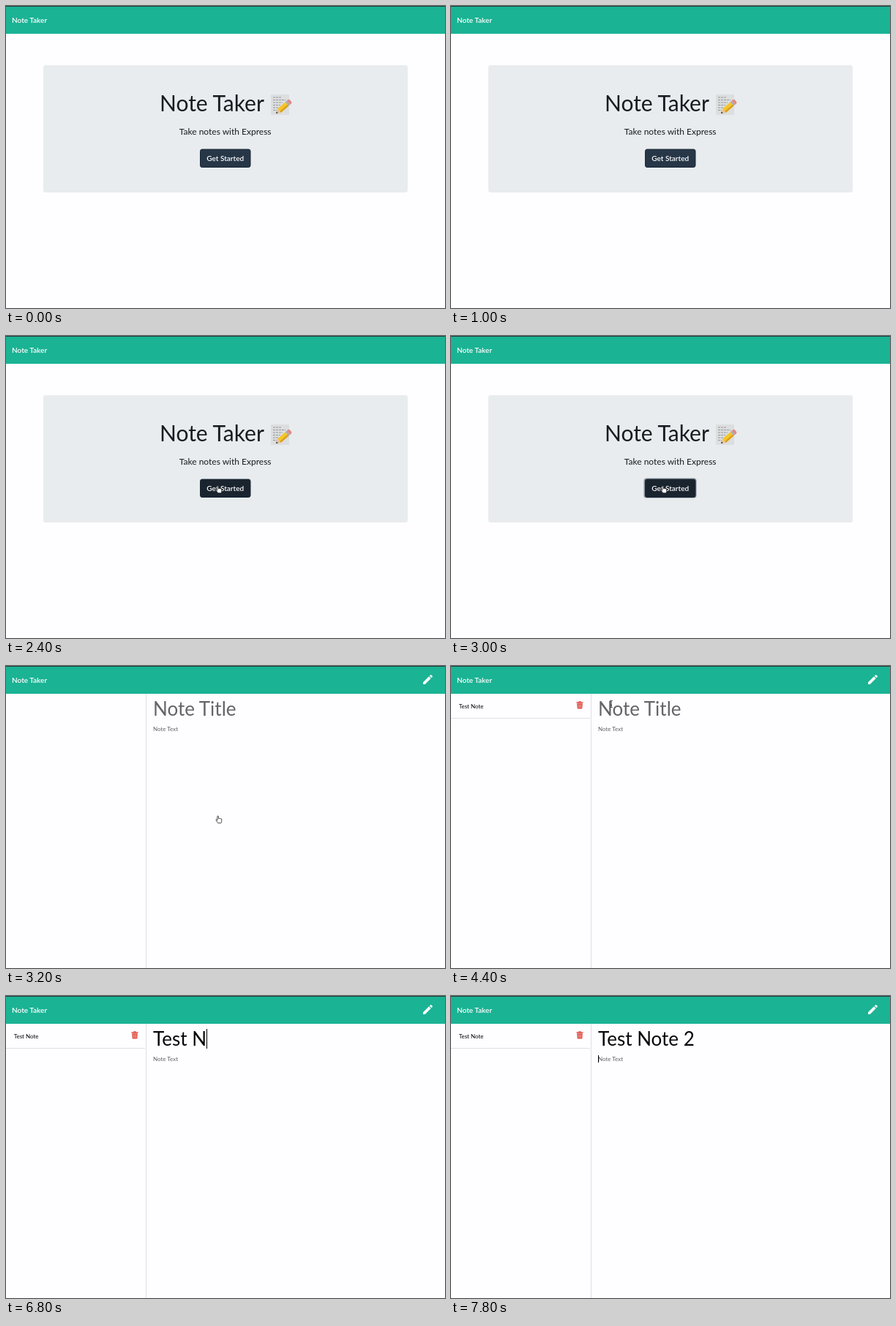
Animation, 600 px wide and 413 px high, one loop 8000 ms. Source, as an HTML page:

```html
<!DOCTYPE html>
<html lang="en">
<head>
<meta charset="utf-8">
<title>Note Taker</title>
<style>
  html, body { margin: 0; width: 100%; height: 100%; overflow: hidden; background: #fefdff; }
  svg { display: block; font-family: Lato, sans-serif; }
  text { white-space: pre; }
  .bold { font-weight: 600; font-size: 10px; fill: #fff; }
  .small { font-size: 8px; }
  #title { font-size: 26px; }
  .middle { text-anchor: middle; fill: #181c20; }
</style>
</head>
<body>
<svg width="600" height="413" viewBox="0 0 600 413">
  <rect width="600" height="413" fill="#fefdff"/>
  <rect width="600" height="38" fill="#1ab394"/>
  <rect width="600" height="1" fill="#20403f"/>
  <text class="bold" x="8" y="23">Note Taker</text>

  <g id="home">
    <rect x="51" y="81" width="498" height="174" rx="3" fill="#e8ecee"/>
    <text x="210" y="144" font-size="30" fill="#181c20">Note Taker</text>
    <g id="memo">
      <rect x="362" y="121" width="25" height="28" rx="1" fill="#dcdedf"/>
      <path d="M365 125h11M365 128.5h17M365 132h13M365 135.5h10M365 139h8M365 142.5h5" stroke="#92979b" stroke-dasharray="3 1"/>
      <g transform="translate(369 147) rotate(-41)">
        <path d="M0 0L6-3.5V3.5Z" fill="#e9c493"/>
        <path d="M0 0L2.4-1.4V1.4Z" fill="#333"/>
        <path d="M6-3.5H20V3.5H6Z" fill="#f5c52c"/>
        <path d="M6 1.2H20V3.5H6Z" fill="#dc9c19"/>
        <path d="M20-3.5h2.5v7H20Z" fill="#a9adb0"/>
        <path d="M22.5-3.5h2q2 0 2 2v3q0 2-2 2h-2Z" fill="#e08a86"/>
      </g>
    </g>
    <text class="middle" x="299.7" y="175.5" font-size="12">Take notes with Express</text>
    <rect id="ring" x="263.5" y="194.5" width="72" height="27" rx="3.5" fill="#8b949b"/>
    <rect id="button" x="265.5" y="196" width="68.5" height="24.5" rx="2.5" stroke="#1b2836"/>
    <text class="bold" x="299.7" y="212" text-anchor="middle">Get Started</text>
  </g>

  <g id="notes">
    <path d="M191.5 38V413" stroke="#dfdfe3"/>
    <path transform="translate(567.9 9.8) scale(.72)" fill="#fff"
      d="M3 17.25V21h3.75L17.81 9.94l-3.75-3.75zM20.71 7.04a1 1 0 0 0 0-1.41l-2.34-2.34a1 1 0 0 0-1.41 0l-1.83 1.83 3.75 3.75z"/>
    <g id="list">
      <path d="M0 71.5H190" stroke="#dfdfe3"/>
      <text class="small" x="10.7" y="58">Test Note</text>
      <g fill="#df4a40">
        <path d="M171.5 49.3h2.6l.7-1.1h2.4l.7 1.1h2.6v1.4h-9z"/>
        <path d="M172.2 51.3h7.6l-.4 6.3q-.1 1-1 1h-4.8q-.9 0-1-1z"/>
        <path d="M174.2 52.5v4.8M176 52.5v4.8M177.8 52.5v4.8" stroke="#fbd9d6" stroke-width=".6"/>
      </g>
    </g>
    <text id="title" x="201" y="68"></text>
    <text class="small" x="201" y="89" fill="#626166">Note Text</text>
    <rect id="caret" width="1"/>
  </g>

  <g id="cursor">
    <path id="arrow" d="M0 0V9.2L2.1 7.3 3.5 10.5 5 9.8 3.7 6.8H6.4Z" fill="#000" stroke="#fff" stroke-width=".6"/>
    <path id="hand" fill="#fff" stroke="#222" stroke-width=".8" stroke-linejoin="round"
      d="M-2.2 1.2V-4q0-.9.8-.9t.8.9V-1.2q.8-.8 1.5 0 .8-.7 1.4.1 1.4-.4 1.4.9V2.2q0 1.2-.8 2.6H-1.2L-3.9 1.2q-.5-1.2.5-1.2z"/>
    <path id="beam" fill="none" stroke="#222" stroke-width=".9" d="M-1.8-4.7Q0-4.7 0-3.8 0-4.7 1.8-4.7M0-3.8V3.8M-1.8 4.7Q0 4.7 0 3.8 0 4.7 1.8 4.7M-1 1.5H1"/>
  </g>
</svg>
<script>
const LOOP = 8000, STEP = 200, NOTE = "Test Note 2";
const OPEN = 3200, LISTED = 3400, FOCUS = 4600, TAB = 7800;

// [time, x, y] along the pointer's way
const route = [
  [1200, 580, 399], [1400, 566, 394], [1800, 399, 337], [2200, 293, 212], [2400, 291, 210],
  [3400, 291, 210], [3800, 289, 254], [4200, 232, 82], [4400, 219, 52]
];
// [time, letters typed]
const typing = [[0, 0], [5600, 1], [5800, 3], [6000, 4], [6400, 5], [6800, 6], [7000, 7], [7200, 9], [7400, 10], [7600, 11]];

const $ = id => document.getElementById(id);
const show = (id, on) => $(id).style.display = on ? "" : "none";
const set = (id, attrs) => Object.entries(attrs).forEach(([k, v]) => $(id).setAttribute(k, v));

function pointerAt(t) {
  const i = route.findIndex(p => p[0] > t);
  if (i < 0) return route.at(-1).slice(1);
  const [t0, x0, y0] = route[Math.max(i - 1, 0)], [t1, x1, y1] = route[i];
  const k = Math.max(0, (t - t0) / (t1 - t0 || 1));
  return [x0 + (x1 - x0) * k, y0 + (y1 - y0) * k];
}

function draw(t) {
  const opened = t >= OPEN;
  show("home", !opened);
  show("notes", opened);
  show("list", t >= LISTED);

  show("ring", t >= 2800);
  set("button", { fill: t >= 2200 ? "#1a242f" : "#273748" });

  const typed = NOTE.slice(0, typing.findLast(k => k[0] <= t)[1]);
  $("title").textContent = typed || "Note Title";
  set("title", { fill: typed ? "#080808" : "#656468" });

  const inText = t >= TAB;
  const width = opened && typed && !inText ? $("title").getComputedTextLength() : 0;
  show("caret", t >= FOCUS);
  set("caret", { x: Math.round(201 + width), y: inText ? 81 : 45, height: inText ? 10 : 27 });

  const kind = t >= 4200 ? "beam" : t >= 2200 && t < LISTED ? "hand" : "arrow";
  show("cursor", t >= 1200 && t < 5400);
  for (const id of ["arrow", "hand", "beam"]) show(id, id === kind);
  set("cursor", { transform: `translate(${pointerAt(t)})` });
}

function tick() {
  draw(Math.floor(performance.now() % LOOP / STEP) * STEP);
  requestAnimationFrame(tick);
}
tick();
</script>
</body>
</html>
```
